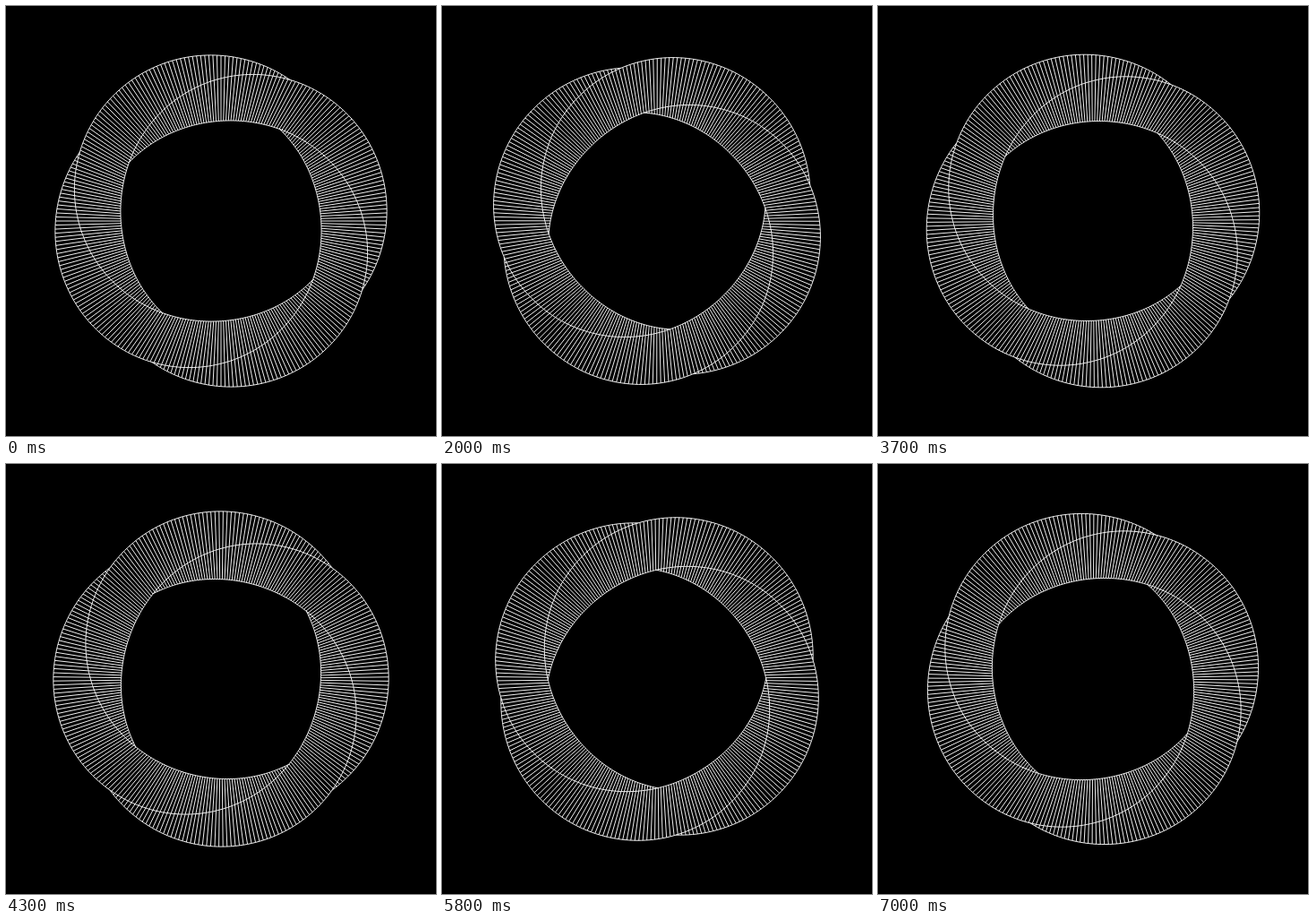
An HTML page for the animation above (7.1 s loop, 480 by 480 pixels).

```html
<!DOCTYPE html>
<html lang="en">
<head>
<meta charset="utf-8">
<title>Twisted ring</title>
<style>
  html, body { margin: 0; width: 100%; height: 100%; overflow: hidden; background: #000; }
  svg { display: block; width: 100%; height: 100%; }
  path { fill: none; stroke: #f0f0f0; stroke-width: 1; stroke-linejoin: round; }
</style>
</head>
<body>
<svg viewBox="0 0 480 480">
  <path id="spokes"/>
  <path id="edges"/>
</svg>
<script>
const LOOP = 7100, STEP = 100;
const RING = 148, HALF = 35.7;             // ring radius, half diagonal of the square section
const EYE = 240 / Math.tan(Math.PI / 6);   // camera distance above the ring
const SPOKES = 256, SEGMENTS = 180;
const TWIST = 93.9;                        // section angle at the first spoke, degrees
const rad = deg => deg * Math.PI / 180;

// Sweep over which a section corner is visible from the camera
const toEye = Math.PI / 2 + Math.atan(RING / EYE);
const reach = Math.PI * 3 / 4 - Math.asin(HALF * Math.SQRT1_2 / Math.hypot(RING, EYE));

const spokes = document.getElementById('spokes');
const edges = document.getElementById('edges');

// Projected distance from the centre for a section corner turned by a
const radius = a => (RING + HALF * Math.cos(a)) * EYE / (EYE - HALF * Math.sin(a));

const point = (r, angle) =>
  (240 + r * Math.cos(angle)).toFixed(2) + ' ' + (240 + r * Math.sin(angle)).toFixed(2);

function spokePath(turn) {
  let d = '';
  for (let i = 0; i < SPOKES; i++) {
    const angle = i / SPOKES * 2 * Math.PI;
    const corners = [0, 1, 2, 3].map(k => radius(rad(TWIST) - angle + k * Math.PI / 2));
    d += 'M' + point(Math.min(...corners), angle + turn) +
         'L' + point(Math.max(...corners), angle + turn);
  }
  return d;
}

function edgePath(turn) {
  let d = '';
  for (let k = 0; k < 4; k++) {
    for (let i = 0; i <= SEGMENTS; i++) {
      const a = toEye + reach * (2 * i / SEGMENTS - 1);
      d += (i ? 'L' : 'M') + point(radius(a), rad(TWIST) - a + k * Math.PI / 2 + turn);
    }
  }
  return d;
}

// The whole ring makes half a turn per loop
function render(ms) {
  const time = Math.floor((ms % LOOP) / STEP) * STEP;
  const turn = Math.PI * time / LOOP;
  spokes.setAttribute('d', spokePath(turn));
  edges.setAttribute('d', edgePath(turn));
}

function tick() {
  render(performance.now());
  requestAnimationFrame(tick);
}
tick();
</script>
</body>
</html>
```
